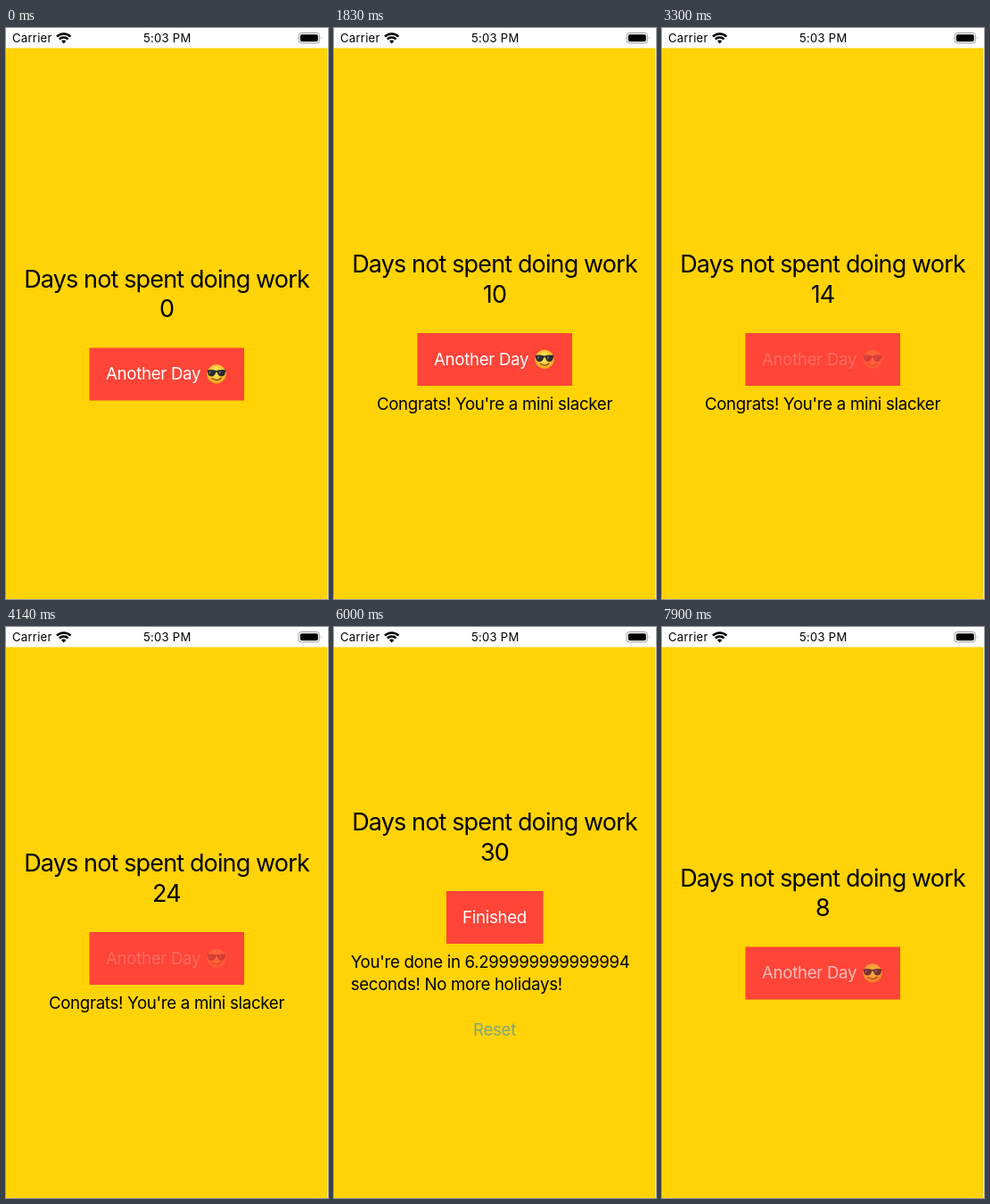
These frames come from a looping animation (361x640 px, 8 s). An HTML page:

```html
<!DOCTYPE html>
<html lang="en">
<head>
<meta charset="utf-8">
<title>Day counter</title>
<style>
  html, body { margin: 0; width: 100%; height: 100%; overflow: hidden; background: #ffd305; }
  svg { display: block; width: 100vw; height: 100vh; }
  text {
    font: 18.7px Inter, "Open Sans", sans-serif;
    font-optical-sizing: none;
    letter-spacing: -.017em;
  }
  .title { font-size: 27px; letter-spacing: -.032em; text-anchor: middle; }
  .status { font-size: 13.1px; letter-spacing: .02em; }
  .middle { text-anchor: middle; }
  .white { fill: #fff; }
</style>
</head>
<body>
<svg viewBox="0 0 361 640">
  <defs>
    <radialGradient id="skin" cx=".5" cy=".4" r=".6">
      <stop offset=".3" stop-color="#ffdf4d"/>
      <stop offset=".75" stop-color="#fcb92f"/>
      <stop offset="1" stop-color="#ec8f1c"/>
    </radialGradient>
  </defs>

  <rect width="361" height="640" fill="#ffd305"/>
  <rect x="360" y="22" width="1" height="618" fill="#fff0a0"/>
  <rect width="361" height="22.5" fill="#fff"/>

  <text class="status" x="7" y="16.2">Carrier</text>
  <g fill="none" stroke="#000" stroke-width="2.5">
    <path d="M57 9.7a11 11 0 0 1 15.4 0M59.8 12.6a7 7 0 0 1 9.8 0"/>
    <path d="M64.7 17.5l-2.6-2.7a3.8 3.8 0 0 1 5.2 0z" fill="#000" stroke="none"/>
  </g>
  <text class="status middle" x="180.7" y="16.2" font-weight="600">5:03 PM</text>
  <rect x="328" y="5.5" width="23.5" height="11.5" rx="3.2" fill="none" stroke="#a0a0a0"/>
  <rect x="329.8" y="7.2" width="20" height="8.1" rx="1.8"/>
  <path d="M353 9.2q1.7 2 0 4z" fill="#a0a0a0"/>

  <g id="stack">
    <text class="title" x="180" y="290.5">Days not spent doing work</text>
    <text class="title" id="count" x="180" y="324.3">0</text>

    <rect id="button" y="358.5" height="59" fill="#ff4438"/>
    <g id="label">
      <g id="another">
        <text class="white" x="112" y="394">Another Day</text>
        <g transform="translate(236 388)">
          <circle r="10.7" fill="url(#skin)"/>
          <path d="M-5 4.6q5.6 4.2 10.2-.4" fill="none" stroke="#7c4410" stroke-width="1.3" stroke-linecap="round"/>
          <path d="M-10.6-4.6Q-5-5.6 0-4.1 5-5.6 10.6-4.6L10-2.6Q9.3 2.6 5.4 2.6 1.6 2.6.9-2.2H-.9Q-1.6 2.6-5.4 2.6-9.3 2.6-10-2.6z" fill="#2b2a2c"/>
          <path d="M-8-3l2.6 0-2.4 3zM3-3l2.6 0-2.4 3z" fill="#77777c"/>
        </g>
      </g>
      <text id="finished" class="white middle" x="180" y="394">Finished</text>
    </g>

    <text id="congrats" class="middle" x="180" y="444.8">Congrats! You're a mini slacker</text>
    <g id="summary">
      <text x="18.7" y="444.4">You're done in 6.299999999999994</text>
      <text x="18.7" y="469.2">seconds! No more holidays!</text>
      <text id="reset" class="middle" x="180" y="520" fill="#007aff">Reset</text>
    </g>
  </g>
</svg>
<script>
  const LOOP = 8000, FADE = 470, DIM = 0.2, GOAL = 30;

  // [time, count]; the count is the floor of the line between points
  const counts = [
    [0, 0], [350, 1], [1390, 10], [2860, 11], [3290, 14], [3410, 15],
    [4135, 24], [4260, 25], [4690, 30], [6999.9, 30], [7000, 1],
    [7130, 2], [7660, 8], [LOOP, 8]
  ];
  // [first press, last release]
  const presses = [[230, 1390], [2750, 4690], [7000, 7650]];

  const ui = {};
  document.querySelectorAll('svg [id]').forEach(el => ui[el.id] = el);
  const show = (el, on) => el.style.display = on ? '' : 'none';

  function countAt(t) {
    const i = counts.findIndex(([time]) => time > t);
    const [t0, c0] = counts[i - 1], [t1, c1] = counts[i];
    return Math.floor(c0 + (c1 - c0) * (t - t0) / (t1 - t0));
  }

  function labelOpacity(t) {
    const press = presses.filter(([start]) => start <= t).pop();
    if (!press) return 1;
    const p = Math.min(1, Math.max(0, (t - press[1]) / FADE));
    return DIM + (1 - DIM) * p * p * (3 - 2 * p);
  }

  function draw(t) {
    const count = countAt(t);
    const done = count >= GOAL;
    const praised = count >= 10 && !done;

    ui.stack.setAttribute('transform', `translate(0 ${done ? -62.5 : praised ? -16.5 : 0})`);
    ui.count.textContent = count;
    ui.button.setAttribute('x', done ? 126 : 93.5);
    ui.button.setAttribute('width', done ? 108.5 : 173.5);
    ui.label.style.opacity = labelOpacity(t);
    ui.reset.style.opacity = t >= 6000 ? 0.5 : 1;
    show(ui.another, !done);
    show(ui.finished, done);
    show(ui.congrats, praised);
    show(ui.summary, done);
  }

  const start = performance.now();
  function tick() {
    draw((performance.now() - start) % LOOP);
    requestAnimationFrame(tick);
  }
  tick();
</script>
</body>
</html>
```
